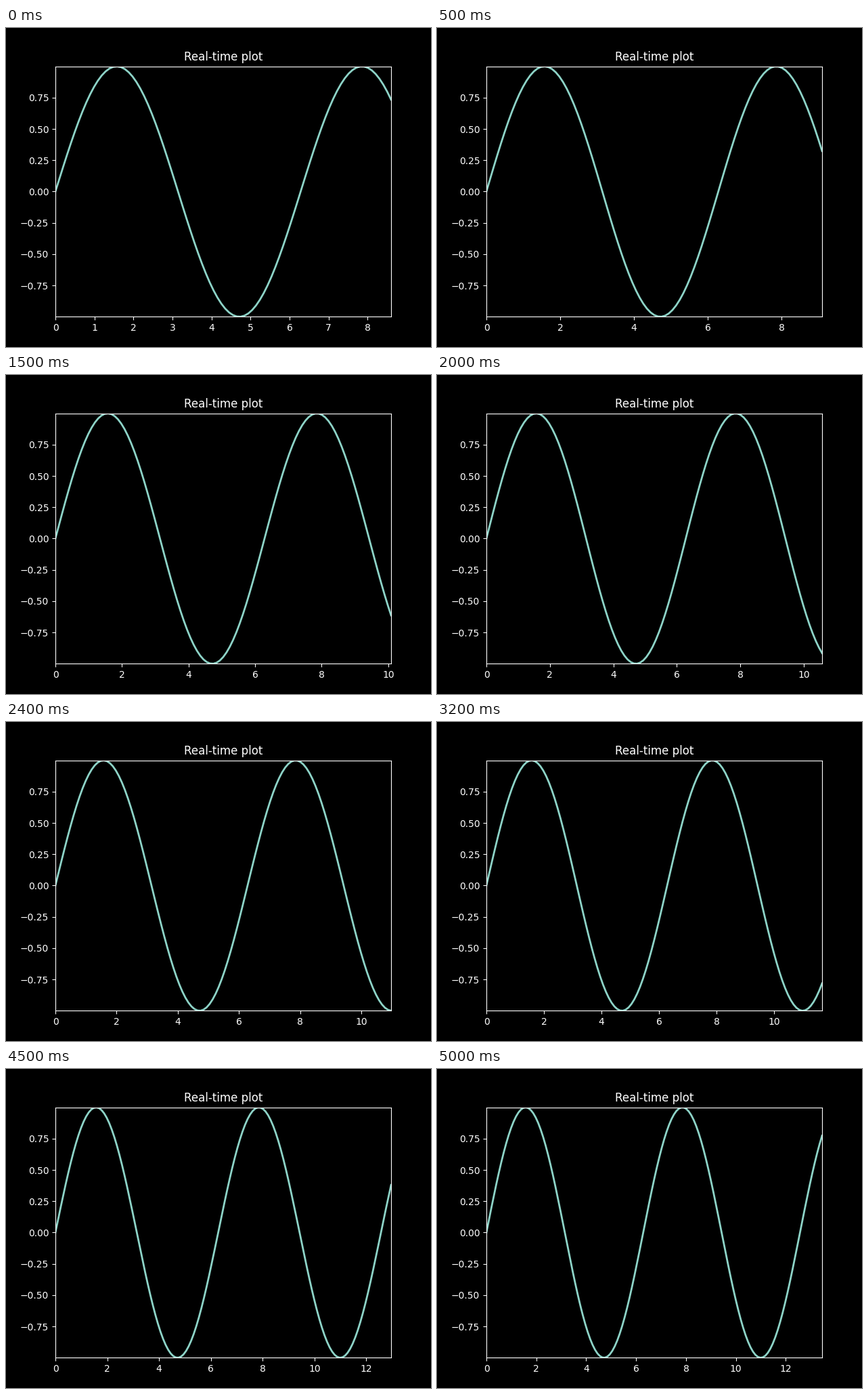
Write a matplotlib script that moves like this. It is 628x471 px and loops after 5100 ms.

```python
import numpy as np
import matplotlib.pyplot as plt
from matplotlib.animation import FuncAnimation

WIDTH, HEIGHT, DPI = 628, 471, 100
FRAMES, INTERVAL = 51, 100
START, STEP = 8.6, 0.099
STALL = 25  # the clock holds still for this one frame

plt.style.use("dark_background")
plt.rcParams["font.family"] = "DejaVu Sans"

fig = plt.figure(figsize=(WIDTH / DPI, HEIGHT / DPI), dpi=DPI)
ax = fig.add_axes([73 / WIDTH, 44.7 / HEIGHT, 496 / WIDTH, 369.6 / HEIGHT])
ax.set_title("Real-time plot")
ax.set_ylim(-0.9999, 0.9997)
line, = ax.plot([], [], color="#8dd3c7", linewidth=2)


def update(frame):
    ticks = frame - (frame >= STALL)
    now = START + STEP * ticks
    t = np.linspace(0, now, round(now / STEP) + 1)
    line.set_data(t, np.sin(t))
    ax.set_xlim(0, now)
    return line,


anim = FuncAnimation(fig, update, frames=FRAMES, interval=INTERVAL,
                     repeat=True, repeat_delay=0, blit=False)
plt.show()
```
